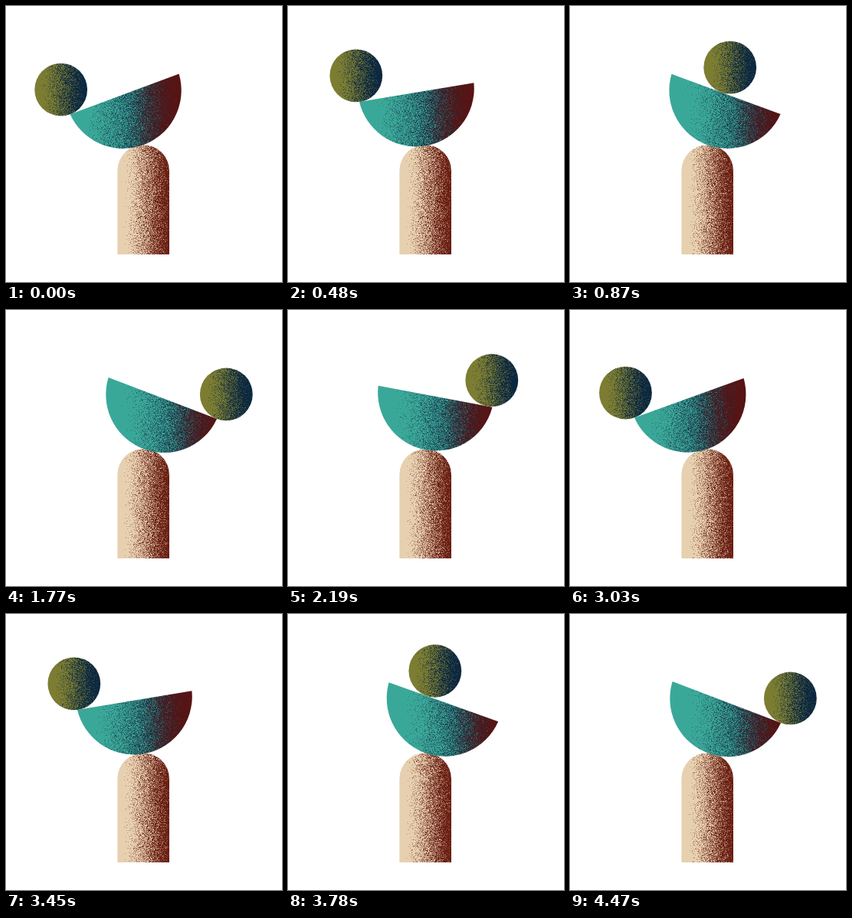
Write an HTML page with a canvas that moves like this. It is 360x360 px and loops after 4.5 s.

```html
<!DOCTYPE html>
<html lang="en">
<head>
<meta charset="utf-8">
<title>Balancing shapes</title>
<style>
html, body { margin: 0; width: 100%; height: 100%; overflow: hidden; background: #fff; }
canvas { display: block; width: 360px; height: 360px; }
</style>
</head>
<body>
<canvas id="stage" width="360" height="360"></canvas>
<script>
const ctx = document.getElementById('stage').getContext('2d');
const LOOP = 4500, STEP = 30, VARIANTS = 8, SPECKS = 3;

const BALL_R = 34.4;
const BOWL_R = 75.9, BOWL_HALF = 75.7, BOWL_DROP = 5.2;
const PILLAR = { x: 145.4, y: 181.2, w: 67.6, bottom: 324 };
const CAP_R = PILLAR.w / 2;
const CAP = { x: PILLAR.x + CAP_R, y: PILLAR.y + CAP_R };
const REACH = 108.2;

// One full swing: the bowl tips right, rests, tips back
const SWING = 2970, LEAD = 130, REST = 20.9;
const TIPS = [{ start: 0, length: 946, dir: 1 }, { start: 1880, length: 720, dir: -1 }];
const ROLL = { starts: [545, 2173], length: 676 };
const KNOCK = { angle: 4, length: 240 };

const clamp = v => Math.min(1, Math.max(0, v));
const smooth = (a, b, v) => { const u = clamp((v - a) / (b - a)); return u * u * (3 - 2 * u); };
const progress = (t, start, length) => clamp((t - start) / length);

// A slow lean that ends in a fast drop
const tipEase = u => 0.65 * u ** 2 + 0.35 * u ** 10;

function tiltAt(t) {
  let angle = -REST;
  for (const { start, length, dir } of TIPS) {
    const knock = Math.sin(Math.PI * progress(t, start + length, KNOCK.length)) ** 4;
    angle += dir * (2 * REST * tipEase(progress(t, start, length)) - KNOCK.angle * knock);
  }
  return angle * Math.PI / 180;
}

function rollAt(t) {
  const [out, back] = ROLL.starts.map(start => progress(t, start, ROLL.length) ** 2);
  return BOWL_HALF * (2 * (out - back) - 1);
}

function random(seed) {
  return () => {
    seed = (seed + 0x6D2B79F5) | 0;
    let n = Math.imul(seed ^ seed >>> 15, 1 | seed);
    n = n + Math.imul(n ^ n >>> 7, 61 | n) ^ n;
    return ((n ^ n >>> 14) >>> 0) / 4294967296;
  };
}

// Grainy left-to-right blend; each layer is [rgb, coverage(u)], with a few specks per pixel
function grain(w, h, base, layers, seed) {
  const canvas = document.createElement('canvas');
  canvas.width = w;
  canvas.height = h;
  const g = canvas.getContext('2d');
  const image = g.createImageData(w, h);
  const rnd = random(seed);
  for (let y = 0, p = 0; y < h; y++) {
    for (let x = 0; x < w; x++, p += 4) {
      let color = base;
      for (const [rgb, coverage] of layers) {
        const chance = coverage(x / w);
        let hits = 0;
        for (let i = 0; i < SPECKS; i++) hits += rnd() < chance;
        color = color.map((c, i) => c + (rgb[i] - c) * hits / SPECKS);
      }
      image.data.set([...color, 255], p);
    }
  }
  g.putImageData(image, 0, 0);
  return canvas;
}

const variants = (w, h, base, layers, seed) =>
  Array.from({ length: VARIANTS }, (_, i) => grain(w, h, base, layers, seed + i * 977));

const textures = {
  ball: variants(72, 72, [124, 125, 50], [
    [[12, 40, 64], u => 0.98 * smooth(0.1, 0.95, u)]
  ], 11),
  bowl: variants(156, 156, [58, 168, 153], [
    [[24, 48, 70], u => 0.92 * smooth(0.14, 0.92, u)],
    [[86, 20, 20], u => smooth(0.5, 0.96, u)]
  ], 23),
  pillar: variants(70, 146, [231, 208, 176], [
    [[106, 32, 20], u => smooth(0.12, 1.06, u)]
  ], 37)
};

function paint(path, texture, x, y) {
  ctx.save();
  ctx.clip(path);
  ctx.drawImage(texture, Math.round(x), Math.round(y));
  ctx.restore();
}

function drawPillar(texture) {
  const path = new Path2D();
  path.arc(CAP.x, CAP.y, CAP_R, Math.PI, 0);
  path.lineTo(PILLAR.x + PILLAR.w, PILLAR.bottom);
  path.lineTo(PILLAR.x, PILLAR.bottom);
  path.closePath();
  paint(path, texture, PILLAR.x - 1, PILLAR.y - 1);
}

function drawBowl(center, tilt, texture) {
  const rim = Math.asin(BOWL_DROP / BOWL_R);
  const path = new Path2D();
  path.arc(center.x, center.y, BOWL_R, tilt + rim, tilt + Math.PI - rim);
  path.closePath();
  paint(path, texture, center.x - 78, center.y - 78);
}

function drawBall(x, y, texture) {
  const path = new Path2D();
  path.arc(x, y, BALL_R, 0, 2 * Math.PI);
  paint(path, texture, x - 36, y - 36);
}

function draw(time) {
  const frame = Math.floor(time % LOOP / STEP);
  const t = (frame * STEP + LEAD) % SWING;
  const pick = name => textures[name][frame * 5 % VARIANTS];

  // The bowl rolls on the round pillar top without slipping
  const tilt = tiltAt(t);
  const lean = tilt / (1 + CAP_R / BOWL_R);
  const bowl = { x: CAP.x + REACH * Math.sin(lean), y: CAP.y - REACH * Math.cos(lean) };

  // The ball stays tangent to the bowl's flat rim
  const along = rollAt(t), above = BALL_R - BOWL_DROP;
  const sin = Math.sin(tilt), cos = Math.cos(tilt);

  ctx.fillStyle = '#fff';
  ctx.fillRect(0, 0, 360, 360);
  drawPillar(pick('pillar'));
  drawBowl(bowl, tilt, pick('bowl'));
  drawBall(bowl.x + along * cos + above * sin, bowl.y + along * sin - above * cos, pick('ball'));
}

const start = performance.now();
function tick() {
  draw(performance.now() - start);
  requestAnimationFrame(tick);
}
tick();
</script>
</body>
</html>
```
